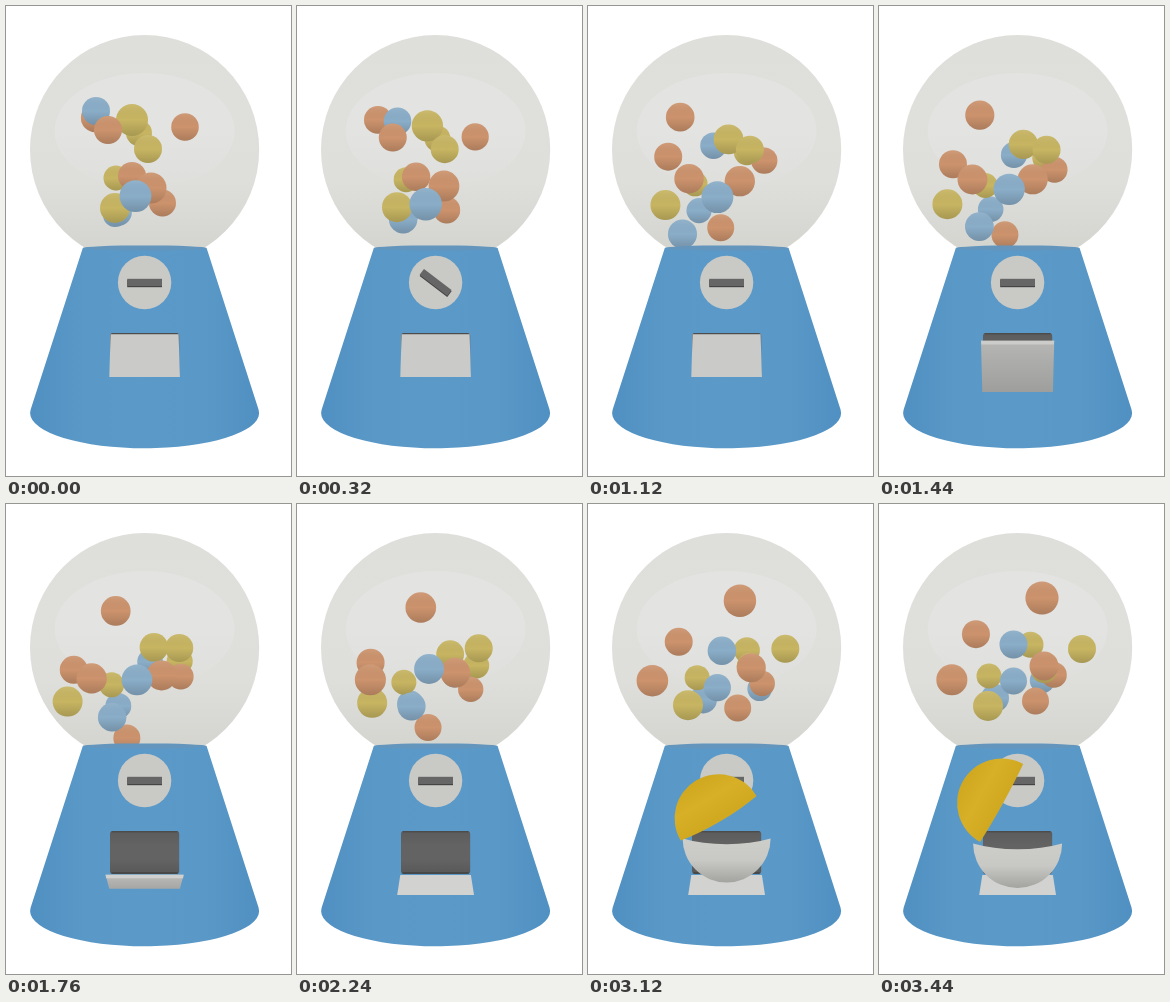
These frames come from a looping animation (285 px wide and 470 px high, 3.52 s). An HTML page with a canvas:

```html
<!DOCTYPE html>
<html lang="en">
<head>
<meta charset="utf-8">
<title>Capsule machine</title>
<style>
html, body { margin: 0; width: 100%; height: 100%; overflow: hidden; background: #fff; }
canvas { display: block; }
</style>
</head>
<body>
<canvas id="stage" width="285" height="470"></canvas>
<script>
const ctx = document.getElementById('stage').getContext('2d');
const LOOP = 3520, STEP = 80, LAST = LOOP - STEP;
const CX = 138.6;
const ORANGE = '#cc936d', YELLOW = '#c7b562', BLUE = '#8aadc8';

const mix = (a, b, p) => a + (b - a) * p;
const ease = (t, from, to) => {
  const p = Math.min(1, Math.max(0, (t - from) / (to - from)));
  return p * p * (3 - 2 * p);
};
const gray = v => `rgb(${v},${v},${v - 2})`;

function fillStops(grad, stops) {
  stops.forEach((c, i) => grad.addColorStop(i / (stops.length - 1), c));
  return grad;
}
const across = (x0, x1, ...stops) => fillStops(ctx.createLinearGradient(x0, 0, x1, 0), stops);
const down = (y0, y1, ...stops) => fillStops(ctx.createLinearGradient(0, y0, 0, y1), stops);

function ellipse(x, y, rx, ry, ...fills) {
  ctx.beginPath();
  ctx.ellipse(x, y, rx, ry, 0, 0, Math.PI * 2);
  for (const fill of fills) {
    ctx.fillStyle = fill;
    ctx.fill();
  }
}

function rect(x, y, w, h, fill) {
  ctx.fillStyle = fill;
  ctx.fillRect(x, y, w, h);
}

// Upright trapezoid around the middle line, given by height and half width of two edges.
function trapezoid(y0, half0, y1, half1, fill) {
  ctx.beginPath();
  ctx.moveTo(CX - half0, y0);
  ctx.lineTo(CX + half0, y0);
  ctx.lineTo(CX + half1, y1);
  ctx.lineTo(CX - half1, y1);
  ctx.closePath();
  ctx.fillStyle = fill;
  ctx.fill();
}

// A ball drifts on a straight line in space and goes back the same way after its turn.
// The points are where it turns and the far end of its longer leg.
const ball = (color, r, turnAt, end, turn = LAST / 2, endR = r) => ({ color, r, turnAt, end, turn, endR });

// Back to front
const balls = [
  ball(BLUE, 12, [109, 209], [116, 194], 0, 14),
  ball(YELLOW, 12.5, [105.5, 181], [110, 172]),
  ball(ORANGE, 13.8, [76.5, 115], [163, 94], 500, 16.6),
  ball(BLUE, 12.2, [176, 189], [90, 105], 2950, 14),
  ball(YELLOW, 13, [182, 163.5], [133, 127], 2120),
  ball(ORANGE, 12.5, [173, 194], [179, 121], 2570, 13.8),
  ball(YELLOW, 16, [126, 114], [165, 166], 0, 13),
  ball(ORANGE, 14, [66, 168], [102, 124], 1850),
  ball(ORANGE, 13.5, [120, 235], [156.5, 197]),
  ball(YELLOW, 14, [142, 143], [203, 145], 0),
  ball(BLUE, 14.6, [93, 230], [134.5, 177], 1040, 13.5),
  ball(YELLOW, 15, [60.5, 197.5], [109, 202]),
  ball(ORANGE, 16, [57, 177.5], [126, 170], 2850, 14),
  ball(ORANGE, 15.5, [145, 182], [165, 162], 0, 14.5),
  ball(BLUE, 16.5, [128, 205], [134.5, 140.5], 580, 14)
];

function drawBall({ color, r, turnAt, end, turn, endR }, t) {
  const p = Math.abs(t - turn) / Math.max(turn, LAST - turn);
  // Depth is the inverse of size, so even motion in space speeds up when near.
  const depth = mix(1 / r, 1 / endR, p);
  const q = p / endR / depth, size = 1 / depth;
  const x = mix(turnAt[0], end[0], q), y = mix(turnAt[1], end[1], q);
  ellipse(x, y, size, size, color,
    down(y - size, y + size, 'rgba(255,255,255,.08)', 'rgba(0,0,0,0)', 'rgba(0,0,0,.16)'));
}

function drawGlobe() {
  ellipse(CX, 143.8, 114.6, 114.8, down(28, 250, '#dededb', '#dfdfdc', '#dededb', '#d3d4ce'));
  ellipse(CX, 125, 90, 58, down(67, 183, '#e3e3e2', '#e3e3e2', 'rgba(227,227,226,0)'));
}

function drawBase() {
  ctx.beginPath();
  ctx.moveTo(200.6, 242);
  ctx.ellipse(CX, 407, 114.5, 35.3, 0, -0.1, Math.PI + 0.1);
  ctx.lineTo(76.8, 242);
  ctx.fillStyle = across(24, 253, '#5090c2', '#5a99c7', '#5b9ac8', '#5a99c7', '#5090c2');
  ctx.fill();
  ellipse(CX, 242, 61.8, 2.6, '#6496bd');
}

function drawKnob(t) {
  ellipse(CX, 276.5, 26.7, 26.7, '#c9c9c6');
  const bar = (dy, fill) => {
    ctx.save();
    ctx.translate(CX, 277 + dy);
    ctx.rotate(Math.PI * ease(t, 0, 1090));
    rect(-17.4, -3.6, 34.8, 7.2, fill);
    ctx.restore();
  };
  bar(0.6, '#444');
  bar(-0.6, '#666');
}

function drawDoor(t) {
  ctx.beginPath();
  ctx.roundRect(CX - 34.6, 327, 69.2, 43, 3);
  ctx.fillStyle = down(327, 370, '#5c5c5c', '#636363', '#636363', '#585858');
  ctx.fill();
  rect(CX - 33, 327, 66, 1.4, '#4c4c4c');
  rect(CX - 33, 368, 66, 2, '#484848');

  // The flap swings down past level and shows its underside on the way.
  const p = ease(t, 1120, 2060), angle = p * 118 * Math.PI / 180;
  const under = Math.sin(Math.PI * p);
  const edge = 371 - 42.7 * Math.cos(angle), half = 34 + 5 * Math.sin(angle);
  const hinge = 371 + 20 * under;
  const light = mix(202, 210, p);
  trapezoid(edge, half, hinge, 35.3, down(edge, hinge, gray(light - 30 * under), gray(light - 62 * under)));
  trapezoid(edge, half, edge + 5 * under, half - 0.5, gray(light));
}

// Half of a ball around the current point; the seam sags by the given amount.
function halfBall(r, lower, sag, fill) {
  ctx.beginPath();
  ctx.arc(0, 0, r, Math.PI, 0, lower);
  ctx.quadraticCurveTo(r * 0.55, sag, 0, sag);
  ctx.quadraticCurveTo(-r * 0.55, sag, -r, 0);
  ctx.fillStyle = fill;
  ctx.fill();
}

function drawCapsule(t) {
  if (t <= 2240) return;
  const out = ease(t, 2240, 2800), lift = ease(t, 2800, LAST);
  const r = mix(20, 43.5, out) + lift;
  const y = mix(348, 329.5, out);

  ctx.save();
  ctx.translate(CX, y + 10 * lift);
  halfBall(r, true, r * 0.13, down(0, r, '#cdcdca', '#c8c8c5', '#a3a3a0'));
  ctx.restore();

  ctx.save();
  ctx.translate(CX - 16 * lift, y - 30.5 * lift);
  ctx.rotate(-61 * Math.PI / 180 * lift);
  halfBall(r, false, r * mix(0.13, 0.03, lift), down(-r, 0, '#cfa81f', '#d7b028', '#d0a921'));
  ctx.restore();
}

function draw(t) {
  rect(0, 0, 285, 470, '#fff');
  drawGlobe();
  balls.forEach(b => drawBall(b, t));
  drawBase();
  drawKnob(t);
  drawDoor(t);
  drawCapsule(t);
}

const start = performance.now();
function tick() {
  const t = (performance.now() - start) % LOOP;
  draw(Math.floor(t / STEP) * STEP);
  requestAnimationFrame(tick);
}
tick();
</script>
</body>
</html>
```
